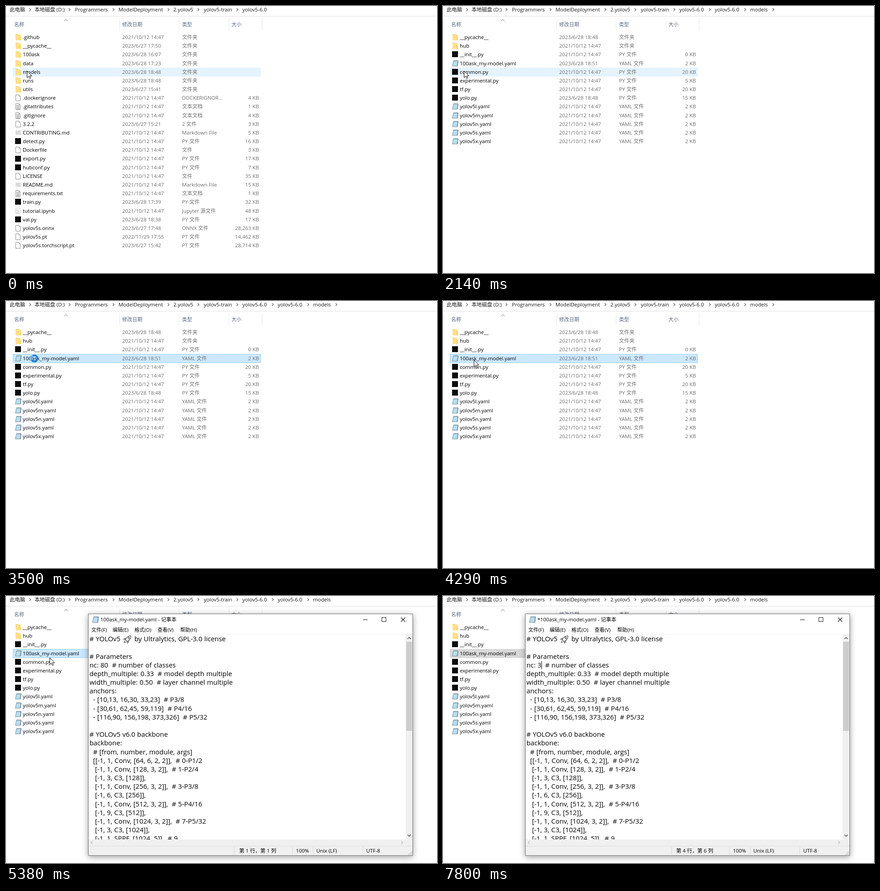
These frames come from a looping animation (950x590 px, 8000 ms). An HTML page with a canvas:

```html
<!DOCTYPE html>
<html lang="zh">
<head>
<meta charset="utf-8">
<style>
html, body { margin: 0; width: 100%; height: 100%; overflow: hidden; background: #fff; }
canvas { display: block; }
</style>
</head>
<body>
<canvas id="stage" width="950" height="590"></canvas>
<script>
const ctx = document.getElementById('stage').getContext('2d');
const FONT = '"Open Sans", "Noto Sans CJK SC", "Noto Sans CJK", sans-serif';
const LOOP = 8000, PITCH = 19.18, CODE_SIZE = 14.85;
const GREY = '#6d6d6d';

const rows = src => src.trim().split('\n').map(line => line.split('|'));

// icon | name | date | type | size
const ROOT = rows(`
folder|.github|2021/10/12 14:47|文件夹|
folder|__pycache__|2023/6/27 17:50|文件夹|
folder|100ask|2023/6/28 16:07|文件夹|
folder|data|2023/6/28 17:23|文件夹|
folder|models|2023/6/28 18:48|文件夹|
folder|runs|2023/6/28 18:48|文件夹|
folder|utils|2023/6/27 15:41|文件夹|
file|.dockerignore|2021/10/12 14:47|DOCKERIGNOR...|4 KB
text|.gitattributes|2021/10/12 14:47|文本文档|1 KB
text|.gitignore|2021/10/12 14:47|文本文档|4 KB
file|3.2.2|2023/6/27 15:21|2 文件|3 KB
md|CONTRIBUTING.md|2021/10/12 14:47|Markdown File|5 KB
py|detect.py|2021/10/12 14:47|PY 文件|16 KB
file|Dockerfile|2021/10/12 14:47|文件|3 KB
py|export.py|2021/10/12 14:47|PY 文件|17 KB
py|hubconf.py|2021/10/12 14:47|PY 文件|7 KB
file|LICENSE|2021/10/12 14:47|文件|35 KB
md|README.md|2021/10/12 14:47|Markdown File|15 KB
text|requirements.txt|2021/10/12 14:47|文本文档|1 KB
py|train.py|2023/6/28 17:39|PY 文件|32 KB
note|tutorial.ipynb|2021/10/12 14:47|Jupyter 源文件|48 KB
py|val.py|2023/6/28 18:38|PY 文件|17 KB
file|yolov5s.onnx|2023/6/27 17:48|ONNX 文件|28,263 KB
file|yolov5s.pt|2022/11/29 17:55|PT 文件|14,462 KB
file|yolov5s.torchscript.pt|2023/6/27 15:42|PT 文件|28,714 KB`);

const MODELS = rows(`
folder|__pycache__|2023/6/28 18:48|文件夹|
folder|hub|2021/10/12 14:47|文件夹|
py|__init__.py|2021/10/12 14:47|PY 文件|0 KB
yaml|100ask_my-model.yaml|2023/6/28 18:51|YAML 文件|2 KB
py|common.py|2021/10/12 14:47|PY 文件|20 KB
py|experimental.py|2021/10/12 14:47|PY 文件|5 KB
py|tf.py|2021/10/12 14:47|PY 文件|20 KB
py|yolo.py|2023/6/28 18:48|PY 文件|15 KB
yaml|yolov5l.yaml|2021/10/12 14:47|YAML 文件|2 KB
yaml|yolov5m.yaml|2021/10/12 14:47|YAML 文件|2 KB
yaml|yolov5n.yaml|2021/10/12 14:47|YAML 文件|2 KB
yaml|yolov5s.yaml|2021/10/12 14:47|YAML 文件|2 KB
yaml|yolov5x.yaml|2021/10/12 14:47|YAML 文件|2 KB`);

const CODE = `# YOLOv5

# Parameters
nc: @  # number of classes
depth_multiple: 0.33  # model depth multiple
width_multiple: 0.50  # layer channel multiple
anchors:
  - [10,13, 16,30, 33,23]  # P3/8
  - [30,61, 62,45, 59,119]  # P4/16
  - [116,90, 156,198, 373,326]  # P5/32

# YOLOv5 v6.0 backbone
backbone:
  # [from, number, module, args]
  [[-1, 1, Conv, [64, 6, 2, 2]],  # 0-P1/2
   [-1, 1, Conv, [128, 3, 2]],  # 1-P2/4
   [-1, 3, C3, [128]],
   [-1, 1, Conv, [256, 3, 2]],  # 3-P3/8
   [-1, 6, C3, [256]],
   [-1, 1, Conv, [512, 3, 2]],  # 5-P4/16
   [-1, 9, C3, [512]],
   [-1, 1, Conv, [1024, 3, 2]],  # 7-P5/32
   [-1, 3, C3, [1024]],
   [-1, 1, SPPF, [1024, 5]],  # 9`.split('\n');

const CRUMBS = [['此电脑', 8, 53], ['本地磁盘 (D:)', 63, 140], ['Programmers', 152, 237],
  ['ModelDeployment', 248, 358], ['2.yolov5', 369, 424], ['yolov5-train', 436, 510],
  ['yolov5-6.0', 521, 588], ['yolov5-6.0', 599, 666], ['models', 677, 728]];

const LOOKS = {
  hover: ['#e5f3ff', null],
  picked: ['#cce8ff', '#99d1ff'],
  idle: ['#d9d9d9', null]
};

// start, row, row look, pointer, x, y
const STEPS = [
  [0, 4, 'hover', 'arrow', 46, 143],
  [270, 4, 'picked', 'arrow', 46, 143],
  [1600, 4, 'picked', 'busy', 46, 143],
  [1870, -1, 'hover', 'busy', 46, 143],
  [2140, 4, 'hover', 'arrow', 46, 143],
  [2440, 3, 'hover', 'arrow', 54, 131],
  [2710, 3, 'hover', 'arrow', 60, 128],
  [2970, 3, 'picked', 'arrow', 62, 127],
  [3500, 3, 'picked', 'wait', 62.5, 127],
  [4290, 3, 'picked', 'arrow', 68, 130],
  [4560, 3, 'picked', 'arrow', 73, 132],
  [5380, 3, 'picked', 'arrow', 96, 136],
  [5650, 3, 'picked', 'arrow', 130, 140],
  [5910, 3, 'picked', 'arrow', 164, 145],
  [6180, 3, 'picked', 'ibeam', 203, 150],
  [6450, 3, 'picked', 'ibeam', 226, 153],
  [7250, 3, 'idle', 'ibeam', 226, 153],
  [7800, 3, 'idle', 'none', 0, 0]
];

function text(str, x, midY, color = '#000', size = 11.35, align = 'left') {
  ctx.font = size + 'px ' + FONT;
  ctx.textAlign = align;
  ctx.fillStyle = color;
  ctx.fillText(str, x, Math.round(midY + size * 0.35));
}

function rect(x, y, w, h, color) {
  ctx.fillStyle = color;
  ctx.fillRect(x, y, w, h);
}

function poly(pts, { fill, stroke, width = 1, close = true }) {
  ctx.beginPath();
  for (let i = 0; i < pts.length; i += 2) ctx.lineTo(pts[i], pts[i + 1]);
  if (close) ctx.closePath();
  if (fill) { ctx.fillStyle = fill; ctx.fill(); }
  if (stroke) { ctx.strokeStyle = stroke; ctx.lineWidth = width; ctx.stroke(); }
}

const line = (pts, stroke, width = 1) => poly(pts, { stroke, width, close: false });

function page(lines) {
  poly([1.5, .5, 8.5, .5, 11.5, 3.5, 11.5, 13.5, 1.5, 13.5], { fill: '#fff', stroke: '#8c8c8c' });
  line([8.5, .5, 8.5, 3.5, 11.5, 3.5], '#a8a8a8');
  for (let i = 0; i < lines; i++) rect(3, 4 + i * 2, 7, 1, '#9a9a9a');
}

// each icon is drawn in a 13 x 14 box
const ICONS = {
  folder() {
    poly([1, 0, 7, 0, 8, 2, 12, 2, 12, 14, 1, 14], { fill: '#f2c65b' });
    rect(1, 1, 10, 13, '#ffe08b');
    rect(10, 6, 3, 8, '#ffd469');
  },
  file() { page(0); },
  text() { page(5); },
  note() {
    poly([1.5, .5, 11.5, .5, 11.5, 12.5, 1.5, 12.5], { fill: '#fff', stroke: '#c4c4c4' });
    for (let i = 0; i < 3; i++) rect(3, 4 + i * 3, 6, 1, '#b5b5b5');
  },
  md() { rect(1, 2, 12, 10, '#dcdcdc'); },
  py() { rect(0, 0, 13, 13, '#0c0c0c'); },
  yaml() {
    poly([3, 1, 13.5, 1, 12, 13, .5, 13], { fill: '#a4cfe3', stroke: '#8a9ca6' });
    poly([4, 3, 11.5, 3, 10, 11.5, 2.5, 11.5], { fill: '#b9dfef' });
    line([13, 2, 11.5, 13], '#5f7d8c');
    for (let i = 0; i < 5; i++) rect(4 + i * 2, 0, 1, 2, '#7b8b93');
  }
};

function icon(kind, x, y, scale = 1) {
  ctx.save();
  ctx.translate(x, y);
  ctx.scale(scale, scale);
  ICONS[kind]();
  ctx.restore();
}

function explorer(list, depth, lastChevron, row, look) {
  rect(0, 22, 950, 1, '#dedede');
  rect(1, 30, 1, 558, '#f0f0f0');
  CRUMBS.slice(0, depth).forEach(([name, x, chev], i) => {
    text(name, x, 8, '#1a1a1a');
    if (i < depth - 1 || lastChevron) line([chev - 1.5, 5, chev + 1.5, 8, chev - 1.5, 11], '#555', 1.1);
  });
  [['名称', 18], ['修改日期', 256], ['类型', 388], ['大小', 497]]
    .forEach(([name, x]) => text(name, x, 41, '#56677f', 11.1));
  [250, 381, 491, 564].forEach(x => rect(x, 28, 1, 26, '#e5e5e5'));
  line([128, 33.5, 131.8, 29.7, 135.6, 33.5], '#666');

  list.forEach(([kind, name, date, type, size], i) => {
    const y = 69 + i * PITCH;
    if (i === row) {
      const [fill, edge] = LOOKS[look], top = Math.round(y - 9.6);
      rect(15, top, 547, 20, fill);
      if (edge) {
        ctx.strokeStyle = edge;
        ctx.lineWidth = 1;
        ctx.strokeRect(15.5, top + .5, 545, 19);
      }
    }
    icon(kind, 20, Math.round(y) - 7);
    text(name, 37, y);
    text(date, 256, y, GREY);
    text(type, 388, y, GREY);
    text(size, 557.5, y, GREY, 11.35, 'right');
  });
}

function rocket(x, y) {
  ctx.save();
  ctx.translate(x, y);
  ctx.rotate(Math.PI / 4);
  poly([-3, 0, -6, 4, -6, 7, -3, 5], { fill: '#fff', stroke: '#222' });
  poly([3, 0, 6, 4, 6, 7, 3, 5], { fill: '#fff', stroke: '#222' });
  ctx.beginPath();
  ctx.moveTo(0, -10);
  ctx.quadraticCurveTo(6, -4, 3, 5);
  ctx.lineTo(-3, 5);
  ctx.quadraticCurveTo(-6, -4, 0, -10);
  ctx.fillStyle = '#fff';
  ctx.fill();
  ctx.stroke();
  ctx.beginPath();
  ctx.arc(0, -3, 1.7, 0, 7);
  ctx.stroke();
  line([-2, 7, 0, 11, 2, 7], '#222');
  ctx.restore();
}

// the shadow stays outside the window so that a see-through window is not darkened
function shadow(x, y, w, h) {
  ctx.save();
  ctx.beginPath();
  ctx.rect(0, 0, 980, 620);
  ctx.rect(x, y, w, h);
  ctx.clip('evenodd');
  ctx.shadowColor = 'rgba(0,0,0,.38)';
  ctx.shadowBlur = 13;
  ctx.shadowOffsetY = 3;
  rect(x, y, w, h, '#fff');
  ctx.restore();
}

function frame(title) {
  shadow(181, 39, 716, 535);
  rect(181, 39, 716, 535, '#fff');
  ctx.strokeStyle = '#707070';
  ctx.lineWidth = 1;
  ctx.strokeRect(181.5, 39.5, 715, 534);
  icon('yaml', 190, 45, 1.05);
  text(title, 208, 52);
  line([787, 52.5, 797, 52.5], '#111');
  ctx.strokeStyle = '#111';
  ctx.strokeRect(828.5, 47.5, 9, 9);
  line([870.5, 47.5, 880, 57], '#111', 1.1);
  line([880, 47.5, 870.5, 57], '#111', 1.1);
  [['文件(F)', 188], ['编辑(E)', 235], ['格式(O)', 283], ['查看(V)', 334], ['帮助(H)', 384]]
    .forEach(([name, x]) => text(name, x, 75.5, '#000', 11.1));
  rect(182, 84, 714, 1, '#ededed');
}

function editor(count, ln, col, caret) {
  ctx.save();
  ctx.beginPath();
  ctx.rect(182, 85, 699, 453);
  ctx.clip();
  ctx.wordSpacing = '0.35px';
  CODE.forEach((str, i) => text(str.replace('@', count), 184, 95 + i * PITCH, '#000', CODE_SIZE));
  rocket(268.5, 95);
  text('by Ultralytics, GPL-3.0 license', 283, 95, '#000', CODE_SIZE);
  if (caret) {
    const x = 184 + ctx.measureText('nc: ' + count).width;
    rect(Math.round(x), 144, 1, 18, '#000');
  }
  ctx.restore();

  rect(881, 85, 15, 453, '#f0f0f0');
  rect(882, 101, 13, 197, '#cdcdcd');
  line([885, 95, 888.5, 91.5, 892, 95], '#505050', 1.5);
  line([885, 527.5, 888.5, 531, 892, 527.5], '#505050', 1.5);
  rect(182, 538, 714, 15, '#f0f0f0');
  line([191, 541.5, 187.5, 545, 191, 548.5], '#bcbcbc', 1.3);
  line([871, 541.5, 874.5, 545, 871, 548.5], '#bcbcbc', 1.3);

  rect(182, 553, 714, 20, '#f0f0f0');
  rect(182, 552, 714, 1, '#dcdcdc');
  [503, 631, 677, 786].forEach(x => rect(x, 554, 1, 18, '#d7d7d7'));
  text(`第 ${ln} 行，第 ${col} 列`, 514, 563);
  text('100%', 639, 563);
  text('Unix (LF)', 684, 563);
  text('UTF-8', 794, 563);
  for (let i = 0; i < 3; i++)
    for (let j = 0; j <= i; j++) rect(893 - j * 3, 564 + i * 3, 2, 2, '#bfbfbf');
}

function ring(x, y, r, width, turn) {
  ctx.lineWidth = width;
  ctx.beginPath();
  ctx.arc(x, y, r, 0, 7);
  ctx.strokeStyle = '#1c83dc';
  ctx.stroke();
  ctx.beginPath();
  ctx.arc(x, y, r, turn, turn + 1.6);
  ctx.strokeStyle = '#5fb4f5';
  ctx.stroke();
}

function arrow(x, y) {
  const shape = [0, 0, 0, 15, 3.4, 11.8, 6, 17, 8.2, 16, 5.8, 11, 10.6, 11];
  poly(shape.map((v, i) => v + (i % 2 ? y : x) + .5), { fill: '#fff', stroke: '#000' });
}

const POINTERS = {
  none() {},
  arrow,
  busy(x, y) {
    arrow(x, y);
    ring(x + 13, y + 1, 5, 3.6, 3);
  },
  wait(x, y, t) { ring(x, y, 6.8, 4, t < 3760 ? 2.6 : 4.6); },
  ibeam(x, y) {
    line([x + .5, y - 7, x + .5, y + 8], '#000');
    line([x - 2.5, y - 7.5, x + 3, y - 7.5], '#000');
    line([x - 2.5, y + 8, x + 3, y + 8], '#000');
  }
};

function draw(t) {
  const [, row, look, pointer, x, y] = STEPS.filter(s => s[0] <= t).pop();
  const inModels = t >= 1870, opening = t >= 4850 && t < 5110, open = t >= 5110;
  rect(0, 0, 950, 590, '#fff');
  explorer(inModels ? MODELS : ROOT, inModels ? 9 : 7, inModels && !open, row, look);

  if (opening) {
    ctx.save();
    ctx.globalAlpha = .69;
    ctx.translate(538.5, 306);
    ctx.scale(.984, .984);
    ctx.translate(-538.5, -306);
    frame('无标题 - 记事本');
    ctx.restore();
  } else if (open) {
    const edited = t >= 7540, clicked = t >= 6720;
    frame((edited ? '*' : '') + '100ask_my-model.yaml - 记事本');
    editor(t >= 7800 ? '3' : edited ? '8' : '80', clicked ? 4 : 1, edited ? 6 : clicked ? 7 : 1, clicked);
  }
  POINTERS[pointer](x, y, t);
}

const start = performance.now();
function tick() {
  draw((performance.now() - start) % LOOP);
  requestAnimationFrame(tick);
}
tick();
</script>
</body>
</html>
```
